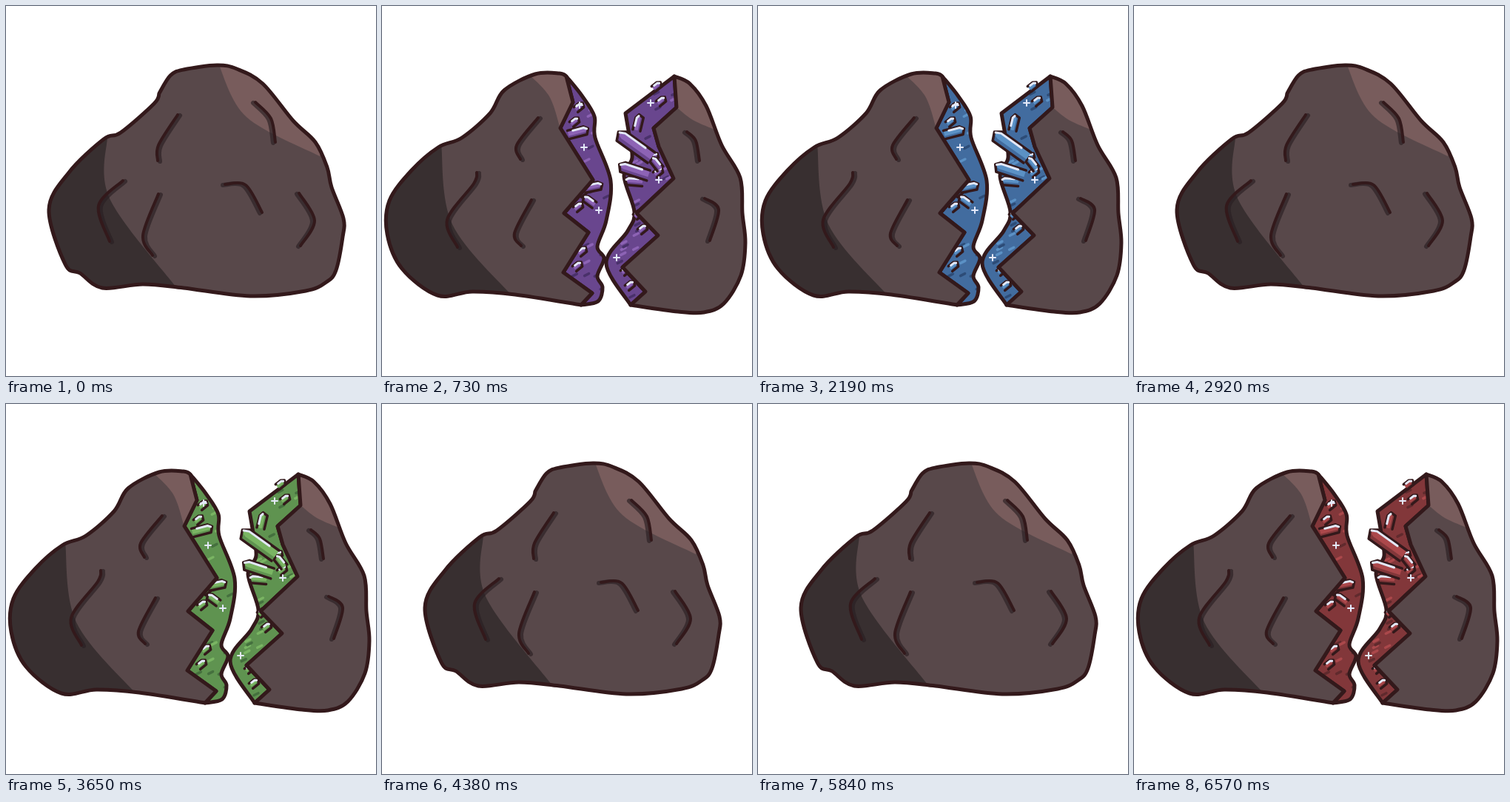
These frames come from a looping animation (500 px wide and 500 px high, 7300 ms). An HTML page with a canvas:

```html
<!DOCTYPE html>
<html lang="en">
<head>
<meta charset="utf-8">
<title>Geode</title>
<style>
html, body { margin: 0; width: 100%; height: 100%; overflow: hidden; background: #fff; }
canvas { display: block; }
</style>
</head>
<body>
<canvas id="stage" width="500" height="500"></canvas>
<script>
const ctx = document.getElementById('stage').getContext('2d');
ctx.lineCap = ctx.lineJoin = 'round';

const STEP = 730;
const ROCK = '#58484a', SHADE = '#382f30', LIGHT = '#785c5c', INK = '#33191b', GLINT = '#e4e9fa';

// One palette per opening: base, bright, deep
const GEMS = [
  ['#69468e', '#8d63b5', '#49316a'],
  ['#426c9f', '#5b91c5', '#2d4c77'],
  ['#5f9350', '#7ab563', '#45703e'],
  ['#b38b3c', '#d8b254', '#81632d'],
  ['#82373a', '#ab484b', '#602a2d']
];

const points = text => text.split(' ').map(pair => pair.split(',').map(Number));

// Catmull-Rom curve through the points, as path commands
function curve(text, start = 'M') {
  const p = points(text);
  let d = start + p[0];
  for (let i = 0; i < p.length - 1; i++) {
    const [a, b, c, e] = [p[i - 1] || p[i], p[i], p[i + 1], p[i + 2] || p[i + 1]];
    d += `C${b[0] + (c[0] - a[0]) / 6},${b[1] + (c[1] - a[1]) / 6} ` +
         `${c[0] - (e[0] - b[0]) / 6},${c[1] - (e[1] - b[1]) / 6} ${c}`;
  }
  return d;
}

function fill(d, color) {
  ctx.fillStyle = color;
  ctx.fill(new Path2D(d));
}
function stroke(d, color = INK, width = 5) {
  ctx.strokeStyle = color;
  ctx.lineWidth = width;
  ctx.stroke(new Path2D(d));
}
function clipped(d, paint) {
  ctx.save();
  ctx.clip(new Path2D(d));
  paint();
  ctx.restore();
}

// Broken edges, bottom to top
const LEFT_JAG = '269,404 284,388 245,360 279,306 246,280 285,235 241,165 258,130 249,95';
const RIGHT_JAG = '336,404 356,386 325,353 373,310 344,280 394,233 374,190 367,165 398,137 395,95';

const whole = {
  outline: curve('207,118 222,94 240,86 285,80 312,85 347,105 388,155 418,184 434,218 440,245 456,287 455,312 446,357 433,373 405,385 330,392 240,381 185,376 130,381 100,361 80,349 58,275 85,225 132,180 155,171 200,132 207,118') + 'Z',
  shade: curve('137,176 140,260 230,380') + 'L0,500L0,170Z',
  light: curve('287,78 325,150 424,203') + 'L460,60Z',
  creases: ['232,147 206,188 205,209', '158,236 125,270 140,318', '206,254 185,310 198,337',
            '296,241 324,242 346,279', '396,253 417,290 398,324', '337,130 358,152 364,184']
};
const left = {
  outline: curve('249,95 240,91 207,92 165,114 146,145 108,178 76,191 40,222 10,263 7,308 27,355 75,391 122,386 180,390 269,404') + 'L' + LEFT_JAG + 'Z',
  shade: curve('80,186 95,295 176,392') + 'L0,500L0,180Z',
  light: curve('196,90 226,122 241,166') + 'L258,130L249,80Z',
  creases: ['211,151 182,188 187,207', '128,225 124,240 88,289 102,326', '202,262 179,307 188,324']
};
const right = {
  outline: curve('395,95 416,105 438,135 459,188 484,232 487,280 491,320 485,364 462,402 435,414 400,413 336,404') + 'L' + RIGHT_JAG + 'Z',
  shade: '',
  light: curve('397,136 420,154 452,168') + 'L470,80L390,80Z',
  creases: ['412,170 424,182 429,209', '436,260 455,275 443,317']
};

// side: direction from the rock towards the gap
const hollows = [
  { jag: LEFT_JAG, side: 1,
    edge: curve('249,95 270,121 287,149 288,178 309,236 303,290 291,325 300,341 291,365 298,380 292,399 269,404') },
  { jag: RIGHT_JAG, side: -1,
    edge: 'M395,95L329,145' + curve('333,168 338,205 327,230 341,278 332,304 303,348 336,404', 'L') }
].map(h => ({ ...h, path: h.edge + 'L' + h.jag + 'Z' }));

// Corners of a broken edge that point into the rock
function pockets({ jag, side }) {
  const p = points(jag);
  return p.filter(([x], i) => p[i - 1] && p[i + 1] &&
    side * (p[i - 1][0] - x) > 0 && side * (p[i + 1][0] - x) > 0);
}

function crease(text) {
  const d = curve(text), towardsMiddle = points(text)[0][0] < 290 ? 3 : -3;
  ctx.save();
  ctx.translate(towardsMiddle, 1);
  stroke(d, 'rgba(42,32,34,.65)', 6);
  ctx.restore();
  stroke(d, INK, 4);
}

function rock({ outline, shade, light, creases }) {
  fill(outline, ROCK);
  clipped(outline, () => {
    fill(shade, SHADE);
    fill(light, LIGHT);
  });
  creases.forEach(crease);
  stroke(outline);
}

// A blunt prism growing from its base; the upper face catches the light
function crystal([tipX, tipY], [baseX, baseY], [base, bright]) {
  const length = Math.hypot(baseX - tipX, baseY - tipY);
  const w = 3 + length * .1, up = baseX > tipX ? -1 : 1;
  ctx.save();
  ctx.translate(tipX, tipY);
  ctx.rotate(Math.atan2(baseY - tipY, baseX - tipX));
  const body = `M${length},${w * up}L${w},${w * up}L0,${w * .3 * up}L${w * .6},${-w * up}L${length},${-w * up}`;
  fill(body + 'Z', base);
  fill(`M0,0L${w},${w * up}H${length}V${-w * .3 * up}H${w}Z`, bright);
  stroke(body, INK, 3.5);
  stroke(`M2,${w * .3 * up}L${w},${w * .7 * up}H${length * .75}`, GLINT, 3);
  ctx.restore();
}

function nugget(x, y, gem) {
  crystal([x + 5, y - 4], [x - 5, y + 4], gem);
}

// Seeded random numbers in 0..1
function randomFrom(seed) {
  return () => (seed = seed * 16807 % 2147483647) / 2147483647;
}

function flecks(gem) {
  const random = randomFrom(71);
  for (let i = 0; i < 90; i++) {
    const x = 240 + random() * 160, y = 100 + random() * 300;
    stroke(`M${x - 3},${y + 1}l6,-3`, gem[1 + i % 2], 3.5);
  }
}

// Tip and base of each large crystal
const crystals = ['279,167 252,174', '298,242 274,247', '272,258 287,269', '349,147 344,168',
                  '364,205 376,220', '328,236 352,238', '320,216 360,229', '318,172 364,205'].map(points);
const sparkles = points('267,134 273,191 293,276 363,131 374,235 317,340');

function openGeode(gem) {
  for (const hollow of hollows) {
    fill(hollow.path, gem[0]);
    clipped(hollow.path, () => flecks(gem));
    stroke(hollow.path);
    for (const [x, y] of pockets(hollow)) {
      nugget(x + 20 * hollow.side, y - 9, gem);
      nugget(x + 26 * hollow.side, y - 29, gem);
    }
  }
  crystals.forEach(([tip, base]) => crystal(tip, base, gem));
  for (const [x, y] of sparkles) stroke(`M${x - 4},${y}h8m-4,-4v8`, GLINT, 2);
  rock(left);
  rock(right);
}

function draw() {
  const step = Math.floor(performance.now() / STEP) % (2 * GEMS.length);
  ctx.clearRect(0, 0, 500, 500);
  if (step % 2) openGeode(GEMS[(step - 1) / 2]);
  else rock(whole);
  requestAnimationFrame(draw);
}
draw();
</script>
</body>
</html>
```
